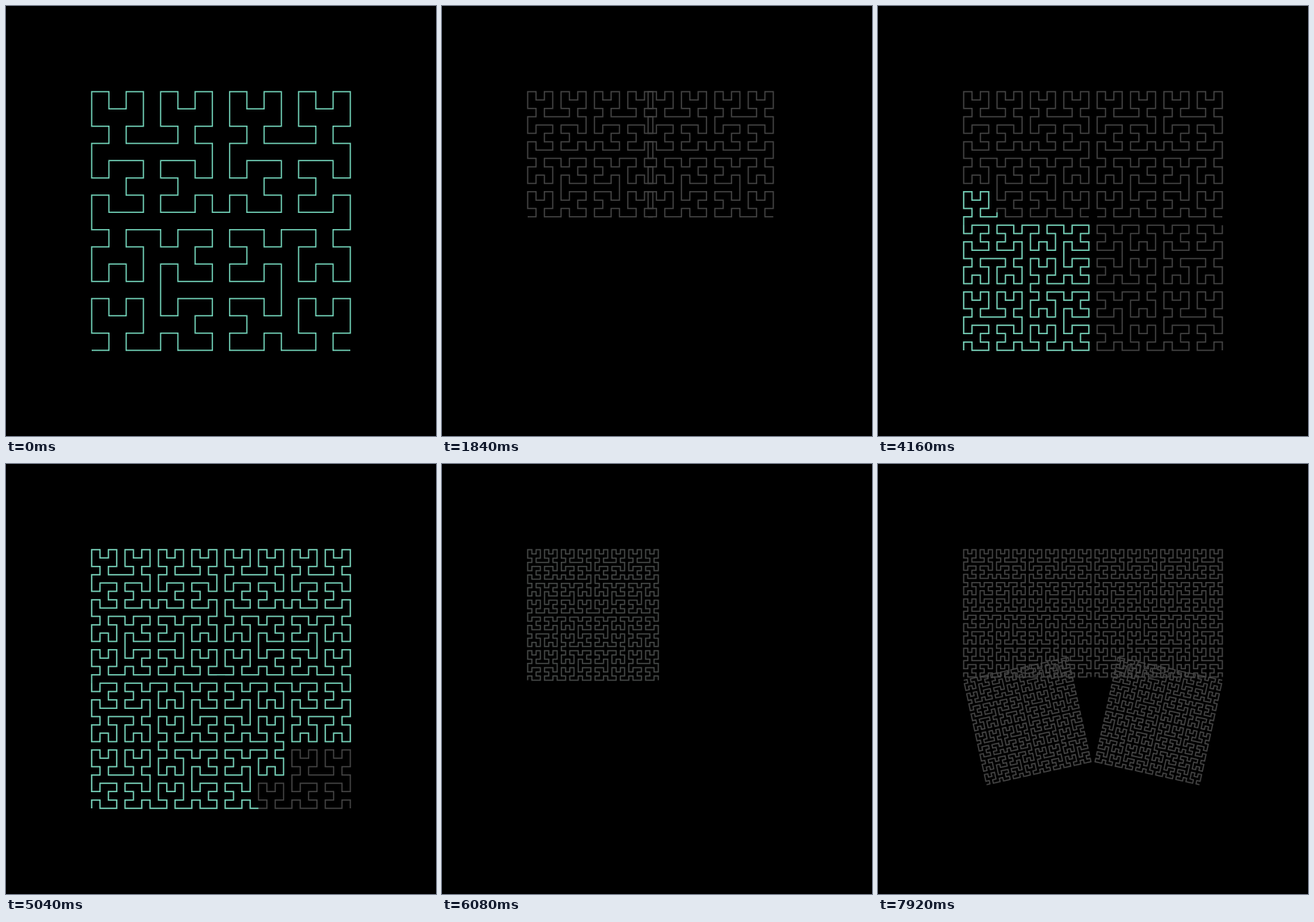
Write an HTML page with a canvas that moves like this. It is 532 px wide and 532 px high and loops after 8000 ms.

```html
<!DOCTYPE html>
<html>
<head>
<meta charset="utf-8">
<style>
html, body { margin: 0; width: 100%; height: 100%; overflow: hidden; background: #000; }
canvas { display: block; }
</style>
</head>
<body>
<canvas id="stage" width="532" height="532"></canvas>
<script>
const ctx = document.getElementById('stage').getContext('2d');
const ORIGIN = 106, SIZE = 320;
const LOOP = 8000, STEP = 80, CYCLE = 5140;
const START = 120, MOVE = 1006, DRAW = 1980;
const TEAL = [116, 214, 188], GRAY = [68, 68, 68];

const mix = (a, b, p) => a + (b - a) * p;
const clamp = v => Math.max(0, Math.min(1, v));
const cubicInOut = v => v < 0.5 ? 4 * v ** 3 : 1 - 4 * (1 - v) ** 3;

// Quarter turns inside a grid whose last index is m
const turnRight = m => ([x, y]) => [m - y, x];
const turnLeft = m => ([x, y]) => [y, m - x];
const shift = (dx, dy) => ([x, y]) => [x + dx, y + dy];

// Hilbert curve from the bottom left to the bottom right corner
function hilbert(order) {
  if (!order) return [[0, 0]];
  const q = hilbert(order - 1), s = 2 ** (order - 1);
  return [
    ...q.map(turnRight(s - 1)).map(shift(0, s)).reverse(),
    ...q,
    ...q.map(shift(s, 0)),
    ...q.map(turnLeft(s - 1)).map(shift(s, s)).reverse()
  ];
}
const curves = [4, 5, 6].map(hilbert);

function stroke(points, cell, color, length = points.length - 1) {
  const px = p => [ORIGIN + p[0] * cell, ORIGIN + p[1] * cell];
  const whole = Math.floor(length);
  ctx.beginPath();
  for (let i = 0; i <= whole; i++) ctx.lineTo(...px(points[i]));
  if (length > whole) {
    const a = points[whole], b = points[whole + 1], f = length - whole;
    ctx.lineTo(...px([mix(a[0], b[0], f), mix(a[1], b[1], f)]));
  }
  ctx.strokeStyle = `rgb(${color.map(Math.round)})`;
  ctx.stroke();
}

function render(time) {
  const level = time < CYCLE ? 0 : 1;
  const now = time % CYCLE - START;
  const phase = k => cubicInOut(clamp((now - k * MOVE) / MOVE));
  const curve = curves[level], s = 2 ** (level + 4), m = s - 1;
  const cell = SIZE / (2 * s - 1);
  const shrink = phase(0), slide = phase(1), turn = phase(2);

  ctx.fillStyle = '#000';
  ctx.fillRect(0, 0, 532, 532);
  ctx.lineWidth = 1.5;

  stroke(curve, mix(SIZE / m, cell, shrink), TEAL.map((c, i) => mix(c, GRAY[i], shrink)));
  if (slide > 0) stroke(curve.map(shift(s * slide, 0)), cell, GRAY);
  if (turn > 0) {
    [[turnRight(m), 0], [turnLeft(m), s]].forEach(([rotate, dx]) => {
      const moved = curve.map(p => {
        const r = rotate(p);
        return [mix(p[0], r[0], turn) + dx, mix(p[1], r[1] + s, turn)];
      });
      stroke(moved, cell, GRAY);
    });
  }
  const drawn = clamp((now - 3 * MOVE) / DRAW) ** 2;
  if (drawn > 0) {
    const next = curves[level + 1];
    stroke(next, cell, TEAL, drawn * (next.length - 1));
  }
}

const begin = performance.now();
function frame() {
  const t = (performance.now() - begin) % LOOP;
  render(Math.floor(t / STEP) * STEP);
  requestAnimationFrame(frame);
}
frame();
</script>
</body>
</html>
```
